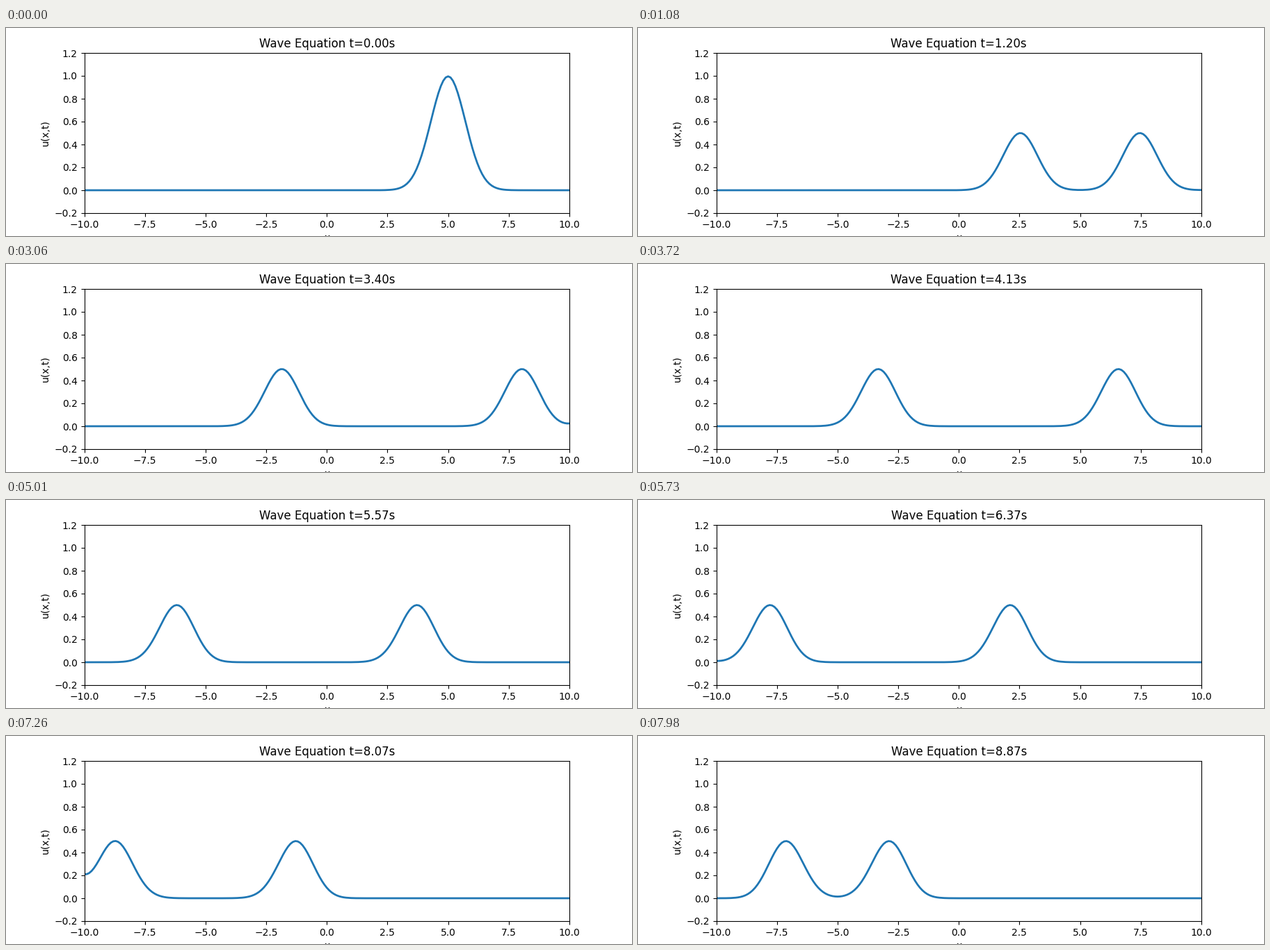
Write a matplotlib script that moves like this. It is 900 by 300 pixels and loops after 8 s.

```python
import numpy as np
import matplotlib.pyplot as plt
from matplotlib.animation import FuncAnimation

SPEED = 2.0
DT = 1 / 30
STEPS = 267
FRAMES, INTERVAL = 400, 20  # 8 s loop; a new wave step every 30 ms

x = np.linspace(-10, 10, 201)
courant2 = (SPEED * DT / (x[1] - x[0])) ** 2


def laplacian(u):
    lap = np.zeros_like(u)
    lap[1:-1] = u[2:] - 2 * u[1:-1] + u[:-2]
    return lap


def reflect(u):
    """Free ends: zero slope at both borders."""
    u[0], u[-1] = u[1], u[-2]
    return u


def solve():
    """Leapfrog solution of the wave equation, starting at rest."""
    prev = np.exp(-(x - 5) ** 2)
    cur = reflect(prev + 0.5 * courant2 * laplacian(prev))
    states = [cur]
    for _ in range(STEPS - 1):
        prev, cur = cur, reflect(2 * cur - prev + courant2 * laplacian(cur))
        states.append(cur)
    return states


waves = solve()

fig, ax = plt.subplots(figsize=(9, 3), dpi=100)
line, = ax.plot(x, waves[0], lw=2)
ax.set_xlim(-10, 10)
ax.set_ylim(-0.2, 1.2)
ax.set_xlabel("x")
ax.set_ylabel("u(x,t)")
title = ax.set_title("")


def update(i):
    step = (2 * i + 1) // 3
    line.set_ydata(waves[step])
    title.set_text(f"Wave Equation t={step * DT:.2f}s")
    return line, title


anim = FuncAnimation(fig, update, frames=FRAMES, interval=INTERVAL,
                     repeat=True, repeat_delay=0, blit=False)
plt.show()
```
